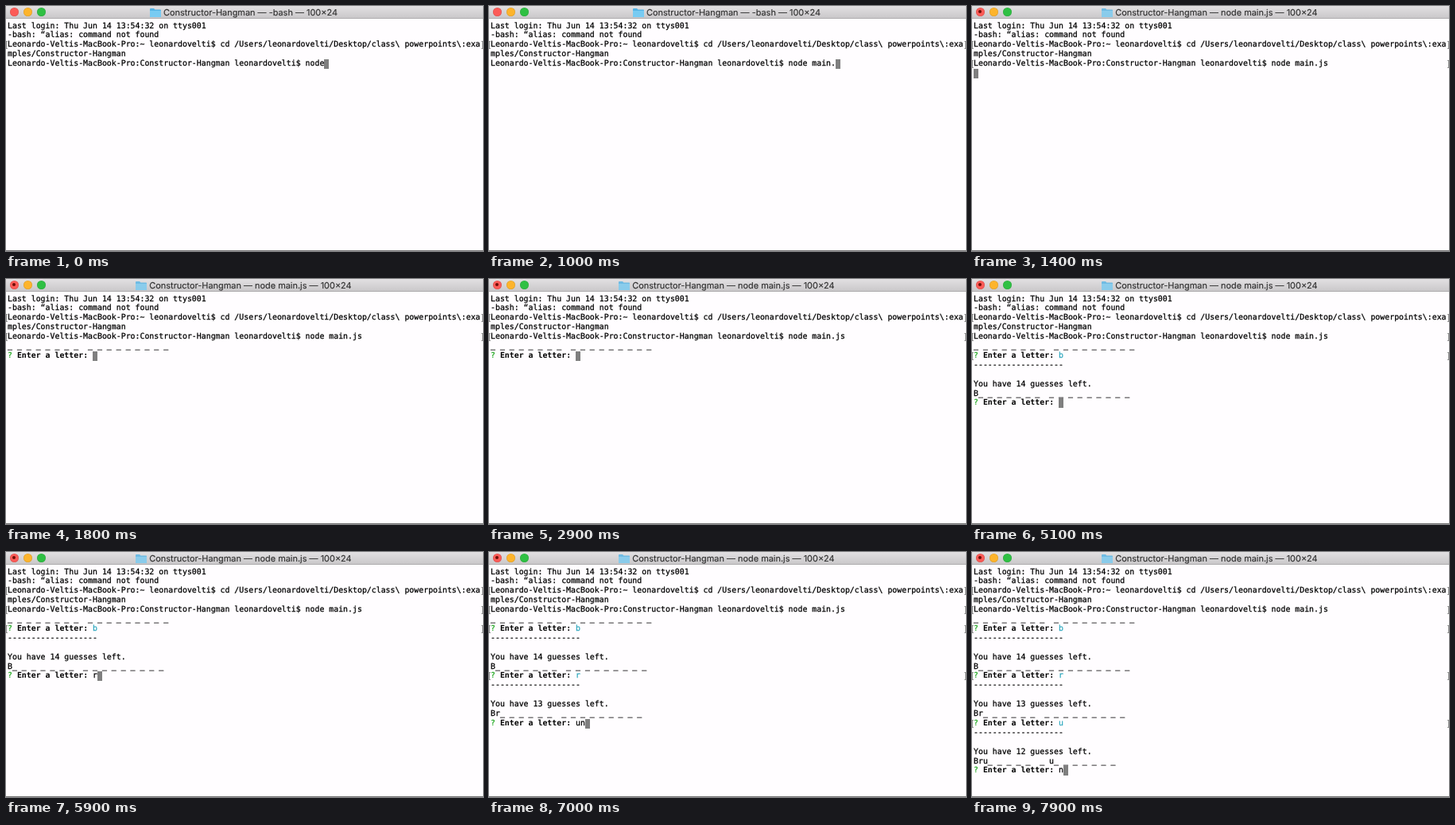
Recreate the animation shown at these times as an HTML page. Size 600 px wide and 308 px high, loop 8 s.

```html
<!DOCTYPE html>
<html lang="en">
<head>
<meta charset="utf-8">
<style>
  html, body { margin: 0; width: 100%; height: 100%; overflow: hidden; }
  body { position: relative; background: #fffdff; }
  #bar {
    position: absolute; inset: 0 0 auto; height: 15px;
    background: linear-gradient(#e2e0e2, #cac8ca); border-bottom: 1px solid #aeacae;
  }
  #bar i {
    position: absolute; top: 1.5px; width: 11px; height: 11px; border-radius: 50%;
    box-shadow: inset 0 0 0 .6px #0002;
  }
  .busy #close::after {
    content: ""; position: absolute; inset: 3.5px; border-radius: 50%; background: #6d0d08;
  }
  #caption {
    position: absolute; left: -1px; top: .5px; width: 600px; height: 14px; display: flex;
    justify-content: center; align-items: center; gap: 3px; white-space: pre;
    font: 10.95px/14px Inter, sans-serif; color: #303030; text-rendering: geometricPrecision;
    -webkit-text-stroke: .15px;
  }
  .busy svg { opacity: .8; }
  .row {
    position: absolute; left: 2px; margin: 0; height: 11.9px; white-space: pre;
    font: 9.89px/11.9px "DejaVu Sans Mono", monospace; color: #000;
    text-rendering: geometricPrecision; -webkit-text-stroke: .25px;
  }
  .row b { -webkit-text-stroke: 0; }
  .mark::before, .mark::after {
    content: ""; position: absolute; top: 1px; width: 1px; height: 8px;
    border: 1px solid #909090;
  }
  .mark::before { left: -2px; border-right: 0; }
  .mark::after { left: 596px; border-left: 0; }
  .ask { color: #2fae2f; }
  .answer { color: #2ba6bd; }
  .cursor { display: inline-block; width: 6px; height: 11.9px; background: #7f7f7f; vertical-align: top; }
  #edge { position: absolute; inset: auto 0 0; height: 1px; background: #777; }
</style>
</head>
<body>
<div id="bar">
  <i id="close" style="left:4.5px;background:#fc5b57"></i>
  <i style="left:21.5px;background:#fdb42c"></i>
  <i style="left:38.5px;background:#2fc043"></i>
  <div id="caption">
    <svg width="14" height="12"><path d="M0 2q0-1 1-1h4l1.500 1.500H13q1 0 1 1V11q0 1-1 1H1q-1 0-1-1z" fill="#55b5e6"/><path d="M0 4h14v7q0 1-1 1H1q-1 0-1-1z" fill="#78cbf2"/></svg><span id="title"></span>
  </div>
</div>
<div id="screen"></div>
<div id="edge"></div>
<script>
const LOOP = 8000, ROW = 11.9, TOP = 19.5;
const START = 1400, BOOT = 1700;
const host = "Leonardo-Veltis-MacBook-Pro", user = "leonardovelti";
const cursor = '<span class="cursor"></span>';
const blanks = n => "_ ".repeat(n);

const command = [[0, ""], [200, " "], [300, " m"], [400, " ma"], [600, " mai"], [700, " main"],
  [900, " main."], [1100, " main.j"], [1200, " main.js"]];

// Each turn: the word so far, the input over time, and when it is entered.
const turns = [
  { word: blanks(8) + " " + blanks(9), input: [[0, ""], [3100, "b"]], enter: 4100 },
  { word: "B" + blanks(7) + " " + blanks(9), input: [[0, ""], [5200, "r"]], enter: 6000 },
  { word: "Br" + blanks(6) + " " + blanks(9),
    input: [[0, ""], [6500, "u"], [6900, "un"], [7200, "u"]], enter: 7500 },
  { word: "Bru" + blanks(5) + " _ u" + blanks(7), input: [[0, ""], [7900, "n"]], enter: LOOP }
];

const at = (steps, t) => steps.filter(s => s[0] <= t).pop()[1];

function lines(t) {
  const out = [];
  const add = (html, mark) => out.push({ html, mark });
  add("Last login: Thu Jun 14 13:54:32 on ttys001");
  add("-bash: “alias: command not found");
  add(`${host}:~ ${user}$ cd /Users/${user}/Desktop/class\\ powerpoints\\:exa`, true);
  add("mples/Constructor-Hangman");
  const started = t >= START;
  add(`${host}:Constructor-Hangman ${user}$ node${at(command, t)}${started ? "" : cursor}`, started);
  if (started && t < BOOT) add(cursor);
  if (t < BOOT) return out;

  for (const [i, turn] of turns.entries()) {
    if (i) {
      add("-".repeat(19));
      add("");
      add(`You have ${15 - i} guesses left.`);
    }
    add(turn.word);
    const done = t >= turn.enter, text = at(turn.input, t);
    add('<b><span class="ask">?</span> Enter a letter:</b> ' +
      (done ? `<span class="answer">${text}</span>` : text + cursor), done);
    if (!done) break;
  }
  return out;
}

const screen = document.getElementById("screen"), title = document.getElementById("title");
let last = "";

function frame(now) {
  const t = now % LOOP, busy = t >= START;
  const html = lines(t).map((l, i) =>
    `<pre class="row${l.mark ? " mark" : ""}" style="top:${TOP + i * ROW}px">${l.html}</pre>`).join("");
  if (html !== last) {
    screen.innerHTML = last = html;
    document.body.className = busy ? "busy" : "";
    title.textContent = `Constructor-Hangman — ${busy ? "node main.js" : "-bash"} — 100×24`;
  }
  requestAnimationFrame(frame);
}
frame(0);
</script>
</body>
</html>
```
